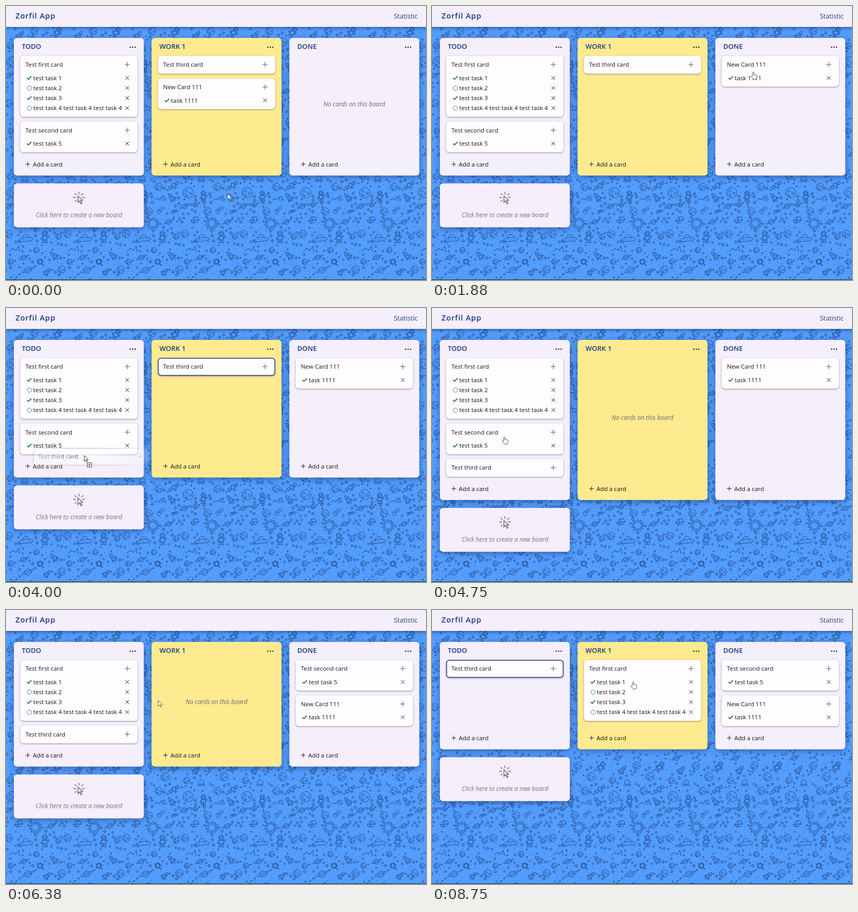
Write an HTML page with a canvas that moves like this. It is 800 px wide and 524 px high and loops after 8880 ms.

```html
<!DOCTYPE html>
<html lang="en">
<head>
<meta charset="utf-8">
<title>Task boards</title>
<style>
html, body { margin: 0; width: 100%; height: 100%; overflow: hidden; background: #539dff; }
canvas { display: block; }
</style>
</head>
<body>
<canvas id="stage" width="800" height="524"></canvas>
<script>
const W = 800, H = 524, LOOP = 8880, STEP = 125;
const FONT = '"Open Sans", "Noto Sans", sans-serif';
const NAVY = '#173a86', LILAC = '#f5eefb', YELLOW = '#feea8f', TEXT = '#15151c';
const COL_X = [15, 277.3, 539.7], COL_W = 247.5, TOP = 61, CARD_W = 223.5;

const makeCanvas = () => Object.assign(document.createElement('canvas'), { width: W, height: H });
const stage = document.getElementById('stage').getContext('2d');
const ghost = makeCanvas().getContext('2d');

// ---------- doodle wallpaper ----------
const DOODLES = {
  planet: 'M9 0A9 9 0 1 1-9 0A9 9 0 1 1 9 0M-3-5a2 2 0 1 1-.1 0M4-1a2 2 0 1 1-.1 0M-2 4a1.2 1.2 0 1 1-.1 0M-8 2Q-4 0-3 7',
  saturn: 'M6 0A6 6 0 1 1-6 0A6 6 0 1 1 6 0M-5-2C-12 2-14 6-10 5C-4 4 13-3 12-6C11-7 8-5 5-4M-4-2Q0 0 4-4',
  rocket: 'M0-12Q5-7 4 4H-4Q-5-7 0-12M-4 0L-7 6-4 5M4 0L7 6 4 5M-3-6H3M2-2A2 2 0 1 1-2-2A2 2 0 1 1 2-2M-2 4L-3 9M0 4V11M2 4L3 9',
  man: 'M5-7A5 5 0 1 1-5-7A5 5 0 1 1 5-7M-3-9H3V-5H-3ZM-4-2H4V5H-4ZM-4-1L-8 4-6 5-4 3M4-1L8-3 8 0 4 3M-4 5L-5 11H-1V6H1V11H5L4 5',
  ufo: 'M-14 2C-14-4 14-4 14 2C12 6-12 6-14 2M-6-2C-6-10 6-10 6-2M-9 5L-12 9M9 5L12 9M-7 1h2M-1 2h2M5 1h2',
  sun: 'M7 0A7 7 0 1 1-7 0A7 7 0 1 1 7 0M8-2L12 0 8 2 10 6 6 6 5 11 1 8-2 12-4 8-9 9-7 4-12 3-9 0-12-4-7-4-8-9-3-8 0-12 2-8 7-10 6-5 11-5Z',
  sat: 'M-3-4H3V4H-3ZM-12-3H-5V3H-12ZM5-3H12V3H5ZM-5 0H-3M3 0H5M-9-3V3M8-3V3M0 4V7M-3 8Q0 5 3 8M0-4V-7',
  meteor: 'M-2 3A3 3 0 1 1-7 5A3 3 0 1 1-2 3M-3 1L8-8M-1 3L9-4M-6 1L3-8',
  octopus: 'M-5 2C-8-9 8-9 5 2Q7 6 8 5M-5 2Q-7 6-8 5M-3 2Q-3 7-5 7M0 2V7M3 2Q3 7 5 7M-5 2H5M-2-2h1M2-2h1',
  rock: 'M-8 5L-4-5 3-8 8-3 5 4-2 8ZM-4-5L0 1 8-3M0 1L-2 8M0 1L-8 5',
  stars: 'M-9 3L-3-1 3 2 8-5 10 4M-9 2v2M-3-2v2M3 1v2M7-5h2M9 4h2'
};
const TILE_W = 112, TILE_H = 250;
const PLACES = [
  ['saturn', 18, 283, .8], ['man', 98, 300, .9, .6], ['planet', 79, 319, .9], ['planet', 54, 298, .8],
  ['rocket', 26, 307, .9, .7], ['octopus', 36, 331, 1], ['sat', 96, 343, .9, -.6], ['planet', 67, 346, .8],
  ['planet', 11, 357, 1.1], ['man', 40, 364, .9], ['rocket', 92, 367, .9, -.7], ['saturn', 4, 383, .8],
  ['planet', 25, 380, .5], ['meteor', 71, 390, .9], ['planet', 48, 393, .8], ['meteor', 97, 393, .7, .4],
  ['rock', 24, 409, .9, .3], ['sun', 56, 416, 1], ['saturn', 86, 413, .8], ['planet', 5, 436, .8],
  ['ufo', 38, 445, 1, -.1], ['man', 74, 442, 1], ['stars', 16, 465, 1], ['planet', 100, 441, .6],
  ['rocket', 92, 478, .9, -.8], ['saturn', 34, 481, .8], ['planet', 58, 467, .6], ['sun', 65, 489, .5],
  ['saturn', 42, 505, 1], ['planet', 106, 504, .8], ['rocket', 78, 509, .8, .8], ['planet', 9, 489, .6],
  ['planet', 8, 326, .7], ['stars', 66, 369, .8]
];

function random(seed) {
  return () => (seed = seed * 16807 % 2147483647) / 2147483647;
}

// Small dots, rings and sparkles fill the room between the doodles.
function smallMarks() {
  const rnd = random(77), marks = [];
  const kinds = ['M-.7 0H.7', 'M1.8 0A1.8 1.8 0 1 1-1.8 0A1.8 1.8 0 1 1 1.8 0', 'M-2 0H2M0-2V2', 'M0-3L1-1 3 0 1 1 0 3-1 1-3 0-1-1Z', 'M-.7 0H.7'];
  for (let i = 0; i < 900; i++) {
    const x = rnd() * TILE_W, y = 275 + rnd() * TILE_H;
    const free = ([, px, py, s, , room = 11 * s + 2]) => {
      const dx = Math.abs(px - x);
      return Math.hypot(Math.min(dx, TILE_W - dx), py - y) > room;
    };
    if (PLACES.every(free) && marks.every(free)) marks.push([kinds[i % kinds.length], x, y, 1, 0, 6]);
  }
  return marks;
}

function wallpaper() {
  const canvas = makeCanvas(), g = canvas.getContext('2d');
  g.fillStyle = '#539dff';
  g.fillRect(0, 0, W, H);
  g.strokeStyle = 'rgba(16,40,92,.78)';
  g.lineJoin = 'round';
  for (const [name, x, y, scale, turn = 0] of [...PLACES, ...smallMarks()]) {
    const path = new Path2D(DOODLES[name] || name);
    g.lineWidth = .85 / scale;
    for (let px = x - TILE_W; px < W + 20; px += TILE_W)
      for (let py = y - 2 * TILE_H; py < H + 20; py += TILE_H) {
        g.save();
        g.translate(px, py);
        g.rotate(turn);
        g.scale(scale, scale);
        g.stroke(path);
        g.restore();
      }
  }
  g.fillStyle = '#20304c';
  g.fillRect(0, H - 1, W, 1);
  return canvas;
}
const backdrop = wallpaper();

// ---------- drawing helpers ----------
function text(g, str, x, y, { size = 11.45, style = '', color = TEXT, align = 'left', spacing = 0 } = {}) {
  g.font = `${style} ${size}px ${FONT}`;
  g.fillStyle = color;
  g.textAlign = align;
  g.letterSpacing = spacing + 'px';
  g.fillText(str, x, y + 4);
}

function line(g, path, x, y, color, width) {
  g.save();
  g.translate(x, y);
  g.strokeStyle = color;
  g.lineWidth = width;
  g.stroke(new Path2D(path));
  g.restore();
}

function panel(g, x, y, w, h, fill, blur, drop, shade) {
  g.save();
  g.shadowColor = `rgba(10,20,50,${shade})`;
  g.shadowBlur = blur;
  g.shadowOffsetY = drop;
  g.fillStyle = fill;
  g.beginPath();
  g.roundRect(x, y, w, h, 6);
  g.fill();
  g.restore();
}

function outline(g, x, y, h, color, width) {
  g.strokeStyle = color;
  g.lineWidth = width;
  g.beginPath();
  g.roundRect(x + .8, y + .8, CARD_W - 1.6, h - 1.6, 5);
  g.stroke();
}

const plus = (g, x, y, arm, color) => line(g, `M${-arm} 0H${arm}M0 ${-arm}V${arm}`, x, y, color, 1);

// ---------- boards ----------
const card = (title, ...tasks) => ({ title, tasks, h: tasks.length ? 39.5 + 19.25 * tasks.length : 34 });
const first = card('Test first card', '+test task 1', '-test task 2', '+test task 3', '-test task 4 test task 4 test task 4');
const second = card('Test second card', '+test task 5');
const third = card('Test third card');
const added = card('New Card 111', '+task 1111');

// each layout holds until the given step
const LAYOUTS = [
  [15, [[first, second], [third, added], []]],
  [34, [[first, second], [third], [added]]],
  [48, [[first, second, third], [], [added]]],
  [64, [[first, third], [], [second, added]]],
  [Infinity, [[third], [first], [second, added]]]
];
const DRAGS = [
  { from: 9, to: 15, card: added, x: 350, y: 154 },
  { from: 28, to: 34, card: third, x: 387, y: 110 },
  { from: 43, to: 48, card: second, x: 137, y: 234 },
  { from: 59, to: 64, card: first, x: 171.5, y: 108.5 }
];
// pointer path: step, x, y
const PATH = [
  [0, 422, 359], [8, 350, 154], [15, 612, 126], [18, 612, 126], [23, 387, 110], [27, 387, 110],
  [32, 149, 282], [34, 140, 281], [36, 140, 281], [39, 137, 234], [42, 137, 234], [46, 587, 171],
  [48, 600, 121], [49, 600, 121], [51, 290, 173], [57, 171.5, 108.5], [58, 171.5, 108.5],
  [61, 380, 135], [63, 383, 137], [71, 383, 137]
];

function drawCard(g, c, x, y) {
  text(g, c.title, x + 10, y + 16.5);
  plus(g, x + 204, y + 16.5, 5, '#5b5b66');
  c.tasks.forEach((task, i) => {
    const cy = y + 42 + 19.25 * i;
    if (task[0] === '+') line(g, 'M-4 .2L-1.4 2.8 4.2-3', x + 17.2, cy, '#1d7d3c', 1.8);
    else line(g, 'M4.2 0A4.2 4.2 0 1 1-4.2 0A4.2 4.2 0 1 1 4.2 0', x + 17.5, cy + .3, '#5365a8', .9);
    text(g, task.slice(1), x + 25, cy);
    line(g, 'M-3.4-3.4L3.4 3.4M-3.4 3.4L3.4-3.4', x + 204, cy, '#222', 1);
  });
}

function arrange(columns) {
  const spots = [];
  let bottom = 0;
  columns.forEach((cards, i) => {
    let y = 95.5;
    for (const c of cards) {
      spots.push({ card: c, x: COL_X[i] + 12, y });
      y += c.h + 9;
    }
    bottom = Math.max(bottom, y - 9 + 44.5);
  });
  return { spots, bottom };
}

function drawBoard(g, i, bottom, empty) {
  const x = COL_X[i];
  panel(g, x, TOP, COL_W, bottom - TOP, i === 1 ? YELLOW : LILAC, 11, 3, .42);
  text(g, ['TODO', 'WORK 1', 'DONE'][i], x + 15, 78.4, { size: 13, style: '600', color: NAVY });
  g.fillStyle = '#222';
  for (const dx of [221.5, 226.2, 230.9]) {
    g.beginPath();
    g.arc(x + dx, 78.7, 1.3, 0, 7);
    g.fill();
  }
  if (empty) text(g, 'No cards on this board', x + COL_W / 2, (bottom + 52.5) / 2,
    { size: 11.7, style: 'italic', color: '#6d6b74', align: 'center' });
  plus(g, x + 26.5, bottom - 21.8, 4.3, '#222');
  text(g, 'Add a card', x + 36, bottom - 21.5);
}

function drawNewBoard(g, y) {
  panel(g, 15, y, COL_W, 84, LILAC, 11, 3, .42);
  line(g, 'M-2-4V8.5L1 5.5 3.8 11 5.8 10 3.2 4.8 7 4.5ZM-11-1h5M6-1h5M0-12v5M-8-9l3.5 3.5M8-9l-3.5 3.5M-8 7l3-3',
    139, y + 28, '#6c6a78', 1.4);
  text(g, 'Click here to create a new board', 139, y + 60.5,
    { size: 11.7, style: 'italic', color: '#77757e', align: 'center' });
}

function drawHeader(g) {
  g.save();
  g.shadowColor = 'rgba(10,20,50,.5)';
  g.shadowBlur = 7;
  g.shadowOffsetY = 2;
  g.fillStyle = LILAC;
  g.fillRect(-10, -10, W + 20, 50);
  g.restore();
  text(g, 'Zorfil App', 18, 19.5, { size: 14.5, style: '600', color: NAVY, spacing: .8 });
  text(g, 'Statistic', 784, 19.5, { size: 12.5, color: '#20407f', align: 'right' });
}

// The dragged copy fades out around the pointer.
function drawGhost(g, c, x, y, px, py) {
  ghost.globalCompositeOperation = 'source-over';
  ghost.clearRect(0, 0, W, H);
  panel(ghost, x, y, CARD_W, c.h, '#fff', 0, 0, 0);
  outline(ghost, x, y, c.h, '#4d5a86', 1);
  drawCard(ghost, c, x, y);
  ghost.globalCompositeOperation = 'destination-in';
  ghost.save();
  ghost.translate(px, py);
  ghost.scale(150, c.h * .95);
  const fade = ghost.createRadialGradient(0, 0, 0, 0, 0, 1);
  fade.addColorStop(0, 'rgba(0,0,0,.75)');
  fade.addColorStop(.5, 'rgba(0,0,0,.4)');
  fade.addColorStop(1, 'rgba(0,0,0,0)');
  ghost.fillStyle = fade;
  ghost.fillRect(-10, -30, 20, 60);
  ghost.restore();
  g.drawImage(ghost.canvas, 0, 0);
}

const ARROW = new Path2D('M0 0V11L2.6 8.6 4.4 12.5 6 11.8 4.3 8H7.8Z');
const HAND = new Path2D('M-1 8V1Q0-1 1 1V5L6 6Q7.5 6.5 7 9L6 14H0L-4 9Q-4 7-2.5 7.5Z');
const COPY = new Path2D('M6 14H14V22H6ZM10 16V20M8 18H12');

function drawPointer(g, x, y, dragging, overCard) {
  g.save();
  g.translate(x, y);
  g.fillStyle = '#fff';
  g.strokeStyle = dragging ? '#1a1a22' : '#4a4a55';
  g.lineWidth = .9;
  const shapes = dragging ? [ARROW, COPY] : [overCard ? HAND : ARROW];
  for (const shape of shapes) {
    g.fill(shape);
    g.stroke(shape);
  }
  g.restore();
}

// ---------- timeline ----------
function pointerAt(step) {
  const i = Math.max(1, PATH.findIndex(([s]) => s >= step));
  const [s0, x0, y0] = PATH[i - 1], [s1, x1, y1] = PATH[i];
  const u = (step - s0) / (s1 - s0), e = u * u * (3 - 2 * u);
  return [x0 + (x1 - x0) * e, y0 + (y1 - y0) * e];
}

function draw(time) {
  const g = stage, step = Math.min(70, Math.floor((time + 5) / STEP));
  const columns = LAYOUTS.find(([until]) => step < until)[1];
  const { spots, bottom } = arrange(columns);
  const drag = DRAGS.find(d => step >= d.from && step < d.to);
  const focused = drag ? drag.card : step >= 64 ? third : null;
  const [px, py] = pointerAt(step);

  g.drawImage(backdrop, 0, 0);
  drawHeader(g);
  columns.forEach((cards, i) => drawBoard(g, i, bottom, !cards.length));
  drawNewBoard(g, bottom + 15);
  for (const { card: c, x, y } of spots) {
    panel(g, x, y, CARD_W, c.h, '#fffdff', 3, 1, .45);
    if (c === focused) outline(g, x, y, c.h, '#1f3f87', 1.5);
    drawCard(g, c, x, y);
  }
  if (drag) {
    const spot = spots.find(s => s.card === drag.card);
    drawGhost(g, drag.card, spot.x + px - drag.x, spot.y + py - drag.y, px, py);
  }
  const over = spots.some(s => px > s.x && px < s.x + CARD_W && py > s.y && py < s.y + s.card.h);
  drawPointer(g, px, py, drag, over);
}

const start = performance.now();
function tick() {
  draw((performance.now() - start) % LOOP);
  requestAnimationFrame(tick);
}
tick();
</script>
</body>
</html>
```
